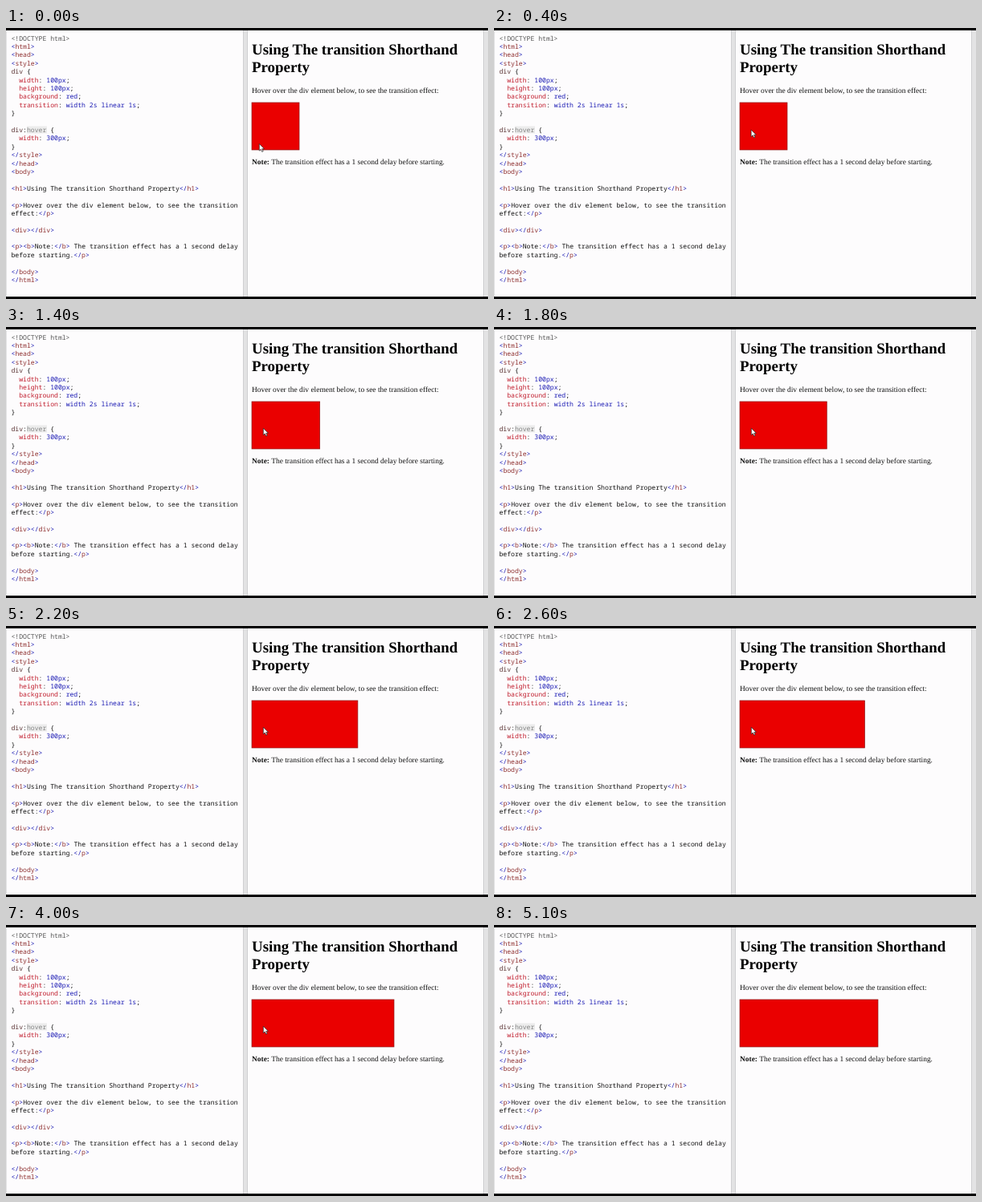
An HTML page that plays this animation: 600 px wide and 338 px high, repeating every 5200 ms.

```html
<!DOCTYPE html>
<html>
<head>
<meta charset="utf-8">
<style>
html, body { margin: 0; width: 100%; height: 100%; overflow: hidden; background: #000; }
svg { display: block; width: 600px; height: 338px; }
text { white-space: pre; text-rendering: geometricPrecision; }
#code { font: 8.12px "Noto Sans Mono", "DejaVu Sans Mono", monospace; fill: #111; }
#page { font: 9.45px "Liberation Serif", "Times New Roman", serif; fill: #111; }
#page .title { font-size: 18.9px; font-weight: bold; fill: #000; }
.mark { fill: #1c1cb4; }
.tag { fill: #8e3030; }
.prop { fill: #c01c2c; }
.value { fill: #1c1cb4; }
.meta { fill: #555; }
.hover { fill: #858585; }
.sel { fill: #5a3434; }
</style>
</head>
<body>
<svg viewBox="0 0 600 338">
  <rect y="3" width="600" height="332" fill="#fdfcfd"/>
  <path d="M0 3h1v332h-1zM295 3h6v332h-6zM594 3h6v332h-6z" fill="#e3e3e4"/>
  <path d="M295.5 3v332M300.5 3v332M594.5 3v332" stroke="#cfcfd1"/>
  <rect x="26" y="122.5" width="25" height="9" fill="#ececec"/>
  <g id="code"></g>
  <g id="page">
    <text class="title" x="306" y="33">Using The transition Shorthand</text>
    <text class="title" x="306" y="55">Property</text>
    <text x="306" y="81">Hover over the div element below, to see the transition effect:</text>
    <text x="306" y="170"><tspan font-weight="bold">Note:</tspan> The transition effect has a 1 second delay before starting.</text>
  </g>
  <rect id="box" x="306" y="93" width="59" height="59" fill="#ea0000" stroke="#8c1414" stroke-width=".7"/>
  <path id="cursor" d="M0 0V8.6L2 6.8L3.4 9.9L4.9 9.2L3.5 6.2H6.2Z" fill="#fff" stroke="#222" stroke-width=".7"/>
</svg>
<script>
const source = `<!DOCTYPE html>
<html>
<head>
<style>
div {
  width: 100px;
  height: 100px;
  background: red;
  transition: width 2s linear 1s;
}

div:hover {
  width: 300px;
}
</style>
</head>
<body>

<h1>Using The transition Shorthand Property</h1>

<p>Hover over the div element below, to see the transition
effect:</p>

<div></div>

<p><b>Note:</b> The transition effect has a 1 second delay
before starting.</p>

</body>
</html>`;

const $ = id => document.getElementById(id);
const span = (type, text) => `<tspan class="${type}">${text}</tspan>`;

const paint = line => line
  .replace(/^<(!.*)>$/, (_, s) => span("meta", `&lt;${s}&gt;`))
  .replace(/<(\/?)(h1|html|head|style|body|p|b|div)>/g, (_, slash, name) =>
    span("mark", "&lt;" + slash) + span("tag", name) + span("mark", "&gt;"))
  .replace(/^  (\w+): (.*);$/, (_, name, value) =>
    `  ${span("prop", name)}: ${span("value", value)};`)
  .replace(/^div(?=[ :])/, span("sel", "div"))
  .replace(/:hover/, ":" + span("hover", "hover"));

$("code").innerHTML = source.split("\n").map((line, i) =>
  `<text x="6.5" y="${15.7 + i * 10.39}">${paint(line)}</text>`).join("");

const clamp = x => Math.min(1, Math.max(0, x));

function draw(now) {
  const t = Math.floor(now % 5200 / 100) * 100;
  // grow for two seconds, then begin to shrink at the same speed
  const grow = clamp((t - 965) / 2000) - clamp((t - 5015) / 2000);
  $("box").setAttribute("width", 59 + 118 * grow);

  const p = clamp(t / 500), ease = p * (2 - p);
  $("cursor").setAttribute("transform", `translate(${315.3 + 5 * ease} ${144.5 - 18.3 * ease})`);
  $("cursor").style.display = t < 4300 ? "" : "none";
  requestAnimationFrame(loop);
}

let start;
function loop(now) {
  start ??= now;
  draw(now - start);
}
requestAnimationFrame(loop);
</script>
</body>
</html>
```
